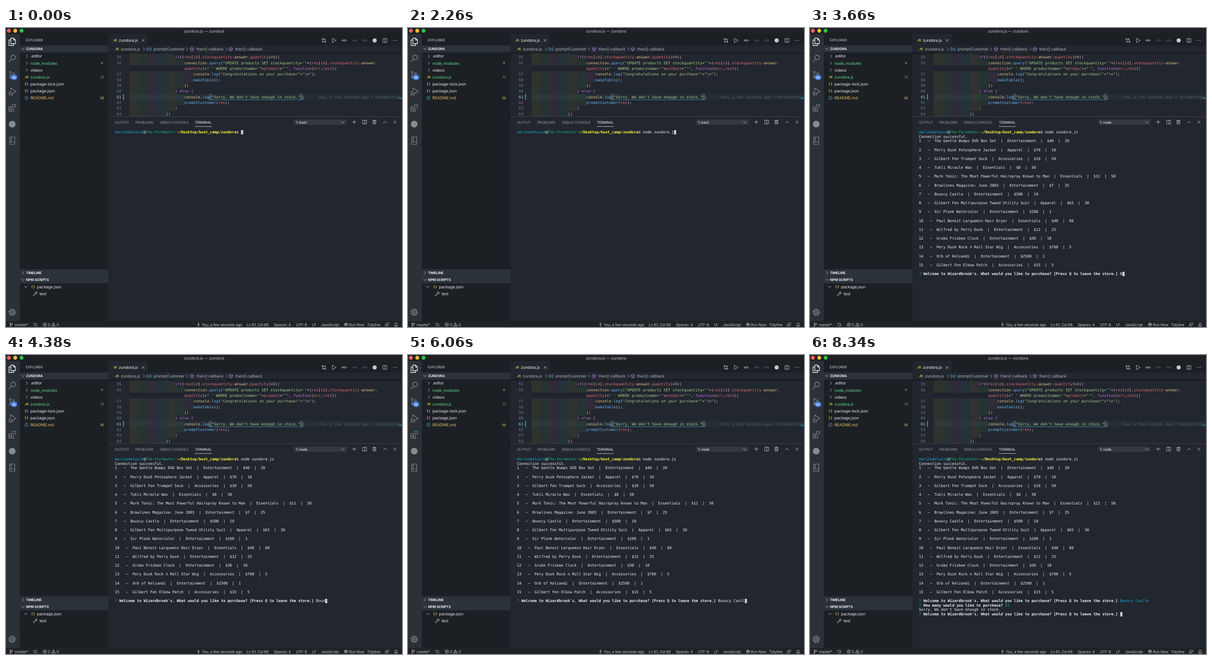
Animation, 862 px wide and 650 px high, one loop 8960 ms. Source, as an HTML page:

```html
<!DOCTYPE html>
<html lang="en">
<head>
<meta charset="utf-8">
<title>Editor session</title>
<style>
  html, body { margin: 0; width: 100%; height: 100%; overflow: hidden; background: #1d2125; }
  svg { display: block; width: 862px; height: 650px; }
  text { white-space: pre; text-rendering: geometricPrecision; }
  .ui { font-family: Inter, Roboto, sans-serif; letter-spacing: -.026em; }
  .mono { font: 8.23px "DejaVu Sans Mono", "Liberation Mono", monospace; }
  .term { letter-spacing: -.0168em; }
  .icon { fill: none; stroke-linecap: round; stroke-linejoin: round; }
</style>
</head>
<body>
<svg id="stage" viewBox="0 0 862 650">
  <defs>
    <clipPath id="codeClip"><rect x="223" y="53" width="639" height="139"/></clipPath>
    <linearGradient id="shade" x2="0" y2="1">
      <stop stop-color="#000" stop-opacity=".45"/><stop offset="1" stop-color="#000" stop-opacity="0"/>
    </linearGradient>
  </defs>
</svg>
<script>
const NS = 'http://www.w3.org/2000/svg';
const stage = document.getElementById('stage');

function add(tag, attrs, parent = stage) {
  const el = document.createElementNS(NS, tag);
  for (const key in attrs) el.setAttribute(key, attrs[key]);
  parent.appendChild(el);
  return el;
}
const rect = (x, y, width, height, fill, parent) => add('rect', { x, y, width, height, fill }, parent);
const disc = (cx, cy, r, fill) => add('circle', { cx, cy, r, fill });

// Text whose capitals are centred on y
function label(x, y, text, fill = '#dcdfe2', size = 8.9, weight = 400, anchor = 'start') {
  const el = add('text', { x, y: y + size * .36, fill, class: 'ui', 'font-size': size,
    'font-weight': weight, 'text-anchor': anchor });
  el.textContent = text;
  return el;
}
// Line drawing around a centre point
const icon = (x, y, d, stroke = '#c5c8cc', width = .9) =>
  add('path', { d, stroke, class: 'icon', 'stroke-width': width, transform: `translate(${x} ${y})` });

const ring = (r, x = 0, y = 0) => `M${x - r} ${y}a${r} ${r} 0 1 0 ${2 * r} 0a${r} ${r} 0 1 0 ${-2 * r} 0`;
const box = (x, y, w, h) => `M${x} ${y}h${w}v${h}h${-w}z`;
const RIGHT = 'M-1.6 -3L1.6 0L-1.6 3', DOWN = 'M-3 -1.6L0 1.6L3 -1.6', UP = 'M-3.5 2L0 -1.7L3.5 2';
const CROSS = 'M-2.7 -2.7L2.7 2.7M2.7 -2.7L-2.7 2.7';
const SPLIT = box(-4, -4, 8, 8) + 'M0 -4V4';
const CUBE = 'M0 -4L3.7 -2V2L0 4L-3.7 2V-2ZM-3.7 -2L0 0L3.7 -2M0 0V4';
const GREY = '#858b92', GREEN = '#62cd8d', AMBER = '#e3b964', YELLOW = '#e2c64c';
const script = (x, y) => label(x, y, 'JS', YELLOW, 6.8, 700);
const braces = (x, y) => label(x, y, '{ }', YELLOW, 7.2, 700);

// Window areas
rect(0, 0, 862, 650, '#1d2125');
rect(0, 13, 30, 624, '#2b3137');
rect(30, 13, 193, 624, '#1c2024');
rect(223, 13, 639, 624, '#22262e');
rect(309, 13, 553, 25, '#1c2024');
rect(30, 38, 193, 15, '#2b3239');
rect(30, 524.5, 193, 30.5, '#2b3239');
['#ff5f57', '#febc2e', '#28c840'].forEach((c, i) => disc(6.3 + i * 13.8, 6, 4.2, c));
label(431, 6.5, 'zundora.js — zundora', '#b8bbbf', 8.9, 400, 'middle');

// Activity bar
icon(13.5, 30, 'M-3 -8H3L7 -4V4H-3ZM3 -8V-4H7M-3 -4H-7V8H3V4', '#f0f1f2', 1.3);
icon(13.5, 66, ring(5, 2, -2) + 'M-1.6 1.6L-7 7.5', GREY, 1.3);
icon(12.5, 101, ring(2, -3, -5) + ring(2, 4, -2) + ring(2, -3, 6) + 'M-3 -3V4M4 0C4 3 -3 1 -3 4', GREY, 1.2);
add('rect', { x: 10.5, y: 101.5, width: 14, height: 11.5, rx: 5.7, fill: '#4582ec' });
label(17.5, 107.3, '5K', '#fff', 6.2, 600, 'middle');
icon(13.5, 138, 'M-3 -2V-8L8 0L0 5M-7 0L-5 1.5M-7.5 4H-6M-7 8L-5 6.5M1 8L-1 6.5M1.5 4H0' + ring(3, -3, 4.5), GREY, 1.2);
icon(13.5, 174, box(-7, -3, 5, 5) + box(-7, 2, 5, 5) + box(-2, 2, 5, 5) + box(1, -8, 6, 6), GREY, 1.2);
disc(13.5, 209, 7.3, GREY);
icon(13.5, 245, box(-5.5, -8, 11, 16) + 'M-5.5 3H5.5M-2 -8V3', GREY, 1.2);
icon(13.5, 618, ring(5.3) + ring(2), GREY, 1.3);
add('circle', { cx: 13.5, cy: 618, r: 6.8, fill: 'none', stroke: GREY, 'stroke-width': 2, 'stroke-dasharray': '2.67 2.67' });

// Explorer
label(43, 26.5, 'EXPLORER', '#c8ccd0', 7.54);
icon(37, 45.5, DOWN);
label(43.5, 45.5, 'ZUNDORA', '#e6e8ea', 7.54, 700);
const files = [['.editor'], ['node_modules', GREEN], ['videos'], ['zundora.js', GREEN],
  ['package-lock.json'], ['package.json'], ['README.md', AMBER]];
files.forEach(([name, color], i) => {
  const y = 61.2 + i * 15.1;
  label(53, y, name, color);
  if (i < 3) icon(45.5, y, RIGHT);
  else if (i === 3) script(41, y);
  else if (i < 6) braces(40.5, y);
  else icon(44.7, y, ring(3.6) + 'M0 -1.9V-1.8M0 -.2V2', '#519aba', .9);
});
disc(209, 76, 2.4, '#397a58');
label(209.5, 106.5, 'U', GREEN, 8.2, 400, 'middle');
label(209, 151.8, 'M', AMBER, 8.2, 400, 'middle');
icon(37, 532.3, RIGHT);
label(43.5, 532.3, 'TIMELINE', '#e6e8ea', 7.54, 700);
icon(37, 547.5, DOWN);
label(43.5, 547.5, 'NPM SCRIPTS', '#e6e8ea', 7.54, 700);
icon(43, 562.7, DOWN);
braces(55, 562.7);
label(67.5, 562.7, 'package.json');
icon(63.5, 578, 'M-4.3 3.2L0 -1.1A2.8 2.8 0 0 1 3.2 -4.4L1.6 -2.4L2.6 -1.4L4.5 -3A2.8 2.8 0 0 1 1.1 .2L-3.1 4.4Z');
label(73, 578, 'test');

// Tab, toolbar and breadcrumbs
script(233.5, 27);
label(245.5, 27, 'zundora.js', '#eef0f2');
icon(298.5, 27, CROSS);
icon(692, 27, ring(1.3, -3, -3) + ring(1.3, 3, 3) + 'M-3 -1.5V3H0M-1.5 1.5L0 3L-1.5 4.5M3 1.5V-3H0M1.5 -4.5L0 -3L1.5 -1.5');
icon(714, 27, 'M-3 -4.5L4.5 0L-3 4.5Z');
icon(736.5, 27, ring(2, 1, 0) + 'M3 0H5M-1 0H-5M-2.8 -2.2L-5 0L-2.8 2.2');
icon(759, 27, ring(2) + 'M-5 0H-2M2 0H5', '#596068');
icon(780.5, 27, ring(2, -1, 0) + 'M-5 0H-3M1 0H5M2.8 -2.2L5 0L2.8 2.2', '#596068');
disc(802.5, 27, 4.6, '#c5c8cc');
icon(825, 27, SPLIT);
[-3.3, 0, 3.3].forEach(dx => disc(847 + dx, 27, .8, '#c5c8cc'));
const CRUMB = '#a9aeb4';
script(237.5, 46);
label(250, 46, 'zundora.js', CRUMB);
[300.5, 394.5, 480].forEach(x => icon(x, 46, RIGHT, CRUMB));
icon(311.3, 46, 'M-2.8 -3.2H-4.4V3.2H-2.8M2.8 -3.2H4.4V3.2H2.8' + ring(1.7), '#62a9dd');
label(321, 46, 'promptCustomer', CRUMB);
[405, 489.5].forEach(x => {
  icon(x, 46, CUBE, '#b180d7');
  label(x + 9.5, 46, 'then() callback', CRUMB);
});

// Code
const code = add('g', { 'clip-path': 'url(#codeClip)' });
const CH = 4.953, LEFT = 269.1, ROW = 12.36;
const TINTS = ['#ffff40', '#7fff7f', '#ff7fff', '#4fecec'];
const SYNTAX = [
  [/"[^"]*"/, '#a9d18a'],
  [/\b(?:if|else|function)\b/, '#c678dd'],
  [/\b(?:console|connection|answer)\b|\}\)/, '#e5c98a'],
  [/\b\w+(?=\()/, '#6cb6f2'],
  [/\b(?:res2?|id|stockquantity|quantity|product|err)\b/, '#e06c75'],
  [/\b\d+\b/, '#d19a66'],
  [/[{}]/, '#cf85dc'],
  [/./, '#d0d5dd']
];
const TOKENS = new RegExp(SYNTAX.map(([re]) => `(${re.source})`).join('|'), 'g');

function codeLine(k, num, indent, source) {
  const y = 63.2 + k * ROW, top = y - ROW / 2;
  if (num) {
    for (let i = 0; i < indent / 4; i++)
      rect(LEFT + i * 4 * CH, top, 4 * CH, ROW, TINTS[i % 4], code).setAttribute('opacity', .057);
    const n = add('text', { x: 251, y: y + 3, class: 'mono', 'text-anchor': 'end',
      fill: num === 61 ? '#c5c9cf' : '#747b85' }, code);
    n.textContent = num;
  }
  const line = add('text', { x: LEFT + indent * CH, y: y + 3, class: 'mono' }, code);
  for (const [s, ...groups] of source.matchAll(TOKENS)) {
    const fill = SYNTAX[groups.findIndex(g => g !== undefined)][1];
    add('tspan', { fill }, line).textContent = s;
  }
}
const activeY = 63.2 + 7 * ROW;
rect(LEFT, activeY - ROW / 2, 593, ROW, '#252d35', code);
rect(LEFT, 63.2 + 1.5 * ROW, 24 * CH, ROW, '#20232b', code);
[
  [54, 16, '}).then( function(answer){'],
  [55, 20, 'if((res[id].stockquantity-answer.quantity)>0){'],
  [56, 24, `connection.query("UPDATE products SET stockquantity='"+(res[id].stockquantity-answer.`],
  [0, 24, `quantity)+" ' WHERE productname='"+product+"'", function(err,res2){`],
  [57, 28, 'console.log("Congratulations on your purchase!"+"\\n");'],
  [58, 28, 'makeTable();'],
  [59, 24, '})'],
  [60, 20, '} else {'],
  [61, 24, `console.log("Sorry. We don't have enough in stock.");`],
  [62, 24, 'promptCustomer(res);'],
  [63, 20, '}'],
  [64, 16, '})']
].forEach((row, i) => codeLine(i - 1, ...row));
[35, 75].forEach(col => add('rect', { x: LEFT + col * CH, y: activeY - 5.7, width: CH, height: 11.4,
  fill: 'none', stroke: '#8d949c', 'stroke-width': .7 }, code));
rect(443, 155.6, 204, .9, '#3f95ad', code);
rect(254.8, activeY - ROW / 2, 1.9, ROW, '#2aa5c9', code);
add('text', { x: 680.5, y: activeY + 3, class: 'mono', fill: '#565d66' }, code)
  .textContent = 'You, a few seconds ago • Uncommitted';
rect(855, 152, 7, 1.6, '#229bc6');
rect(223, 53, 639, 4, 'url(#shade)');

// Panel header
rect(223, 192, 639, .8, '#454b53');
[[237, 'OUTPUT'], [281.5, 'PROBLEMS'], [335, 'DEBUG CONSOLE'], [411, 'TERMINAL']].forEach(([x, s]) =>
  label(x, 205, s, s === 'TERMINAL' ? '#f0f1f2' : '#959ba2', 7.54));
rect(411, 213.7, 37, .9, '#d8dadd');
rect(627, 199, 114, 11.5, '#343940');
const shell = label(631, 205, '1: bash', '#eceef0', 7.8);
icon(733, 205, DOWN);
icon(758, 204.5, 'M-4 0H4M0 -4V4');
icon(781, 204.5, SPLIT);
icon(802, 204.5, 'M-4 -3H4M-1.3 -3V-4.4H1.3V-3M-3 -3V4.2H3V-3M-1 -1V2.4M1 -1V2.4');
icon(825, 204.5, UP);
icon(846.7, 204.5, CROSS);

// Status bar
rect(0, 637, 862, 13, '#1f2328');
const status = (x, s) => label(x, 644.7, s, '#bfc3c8', 8.23);
icon(11.5, 644.7, ring(1.2, -2, -2.8) + ring(1.2, 2, -1.6) + ring(1.2, -2, 2.8) + 'M-2 -1.6V1.6M2 -.4C2 1.5 -2 .5 -2 1.6');
icon(64, 644.7, 'M-3.2 -.6A3.3 3.3 0 0 1 3 -1.3M3.2 .6A3.3 3.3 0 0 1 -3 1.3M-4.3 -1.6L-3.2 -.4L-2 -1.6M4.3 1.6L3.2 .4L2 1.6');
icon(84.5, 644.7, ring(3.6) + 'M-1.4 -1.4L1.4 1.4M1.4 -1.4L-1.4 1.4');
icon(103.3, 644.7, 'M0 -3.6L4 3.3H-4ZM0 -1V1M0 2.1V2.2');
icon(419, 644.7, ring(1.7) + 'M0 -4.3V-1.7M0 1.7V4.3');
icon(740, 644.7, ring(.7) + 'M0 1V4M-1.8 1.6A2.3 2.3 0 1 1 1.8 1.6M-2.8 2.8A3.8 3.8 0 1 1 2.8 2.8');
icon(829, 644.7, 'M-.5 -3.5H4V1H2.5L1 2.5V1M-4 4C-4 .5 1 .5 1 4' + ring(1.5, -1.6, -.5), '#b9bdc2', .8);
icon(849.3, 644.7, 'M-3.5 2.5H3.5L2.5 1V-1A2.5 2.5 0 0 0 -2.5 -1V1ZM-1 4H1');
[[19, 'master*'], [91, '0'], [110, '0'], [426, 'You, a few seconds ago'], [524, 'Ln 61, Col 66'], [583, 'Spaces: 4'],
  [631, 'UTF-8'], [666, 'LF'], [685.5, 'JavaScript'], [746.5, 'Run Now'], [786, 'Tidyline']]
  .forEach(item => status(...item));

// Terminal
const TX = 237, TCH = 4.816, TROW = 9.625, CYAN = '#12a9d6', LIME = '#0dbc79', WHITE = '#eceef0';
const term = add('g', {});
const cursor = rect(0, 0, TCH, 9.4, '#c9ccd0');
const goods = [
  'The Gentle Wumps DVD Box Set|Entertainment|$40|20',
  'Perry Dusk Petosphere Jacket|Apparel|$70|10',
  'Gilbert Fen Trumpet Sock|Accessories|$10|50',
  'Tukli Miracle Wax|Essentials|$8|50',
  'Murk Tonic: The Most Powerful Hairspray Known to Man|Essentials|$11|50',
  'Browlines Magazine: June 2003|Entertainment|$7|25',
  'Bouncy Castle|Entertainment|$500|10',
  'Gilbert Fen Multipurpose Tweed Utility Suit|Apparel|$65|30',
  'Sir Plonk Watercolor|Entertainment|$100|1',
  'Paul Benoit Larquemin Hair Dryer|Essentials|$40|80',
  'Wilfred by Perry Dusk|Entertainment|$12|25',
  'Grubo Frisbee Clock|Entertainment|$30|10',
  'Pery Dusk Rock n Roll Star Wig|Accessories|$700|5',
  'Orb of Kelzandi|Entertainment|$2500|1',
  'Gilbert Fen Elbow Patch|Accessories|$15|5'
];
const listing = [[['Connection successful.']]];
goods.forEach((g, i) => listing.push([[`${i + 1}   –  ${g.split('|').join('  |  ')}`]], []));

const shellPrompt = [['marinodelwick', CYAN], ['@'], ['The-Fernmotor:', LIME],
  ['~/Desktop/boot_camp/zundora', '#f5f543', 700], ['$ ']];
const question = s => [['? ', LIME], [s + ' ', WHITE, 700]];
const shopPrompt = question("Welcome to Wizardbrook's. What would you like to purchase? [Press Q to leave the store.]");
const amountPrompt = question('How many would you like to purchase?');

const RUN = 2740, LIST = 3240, CHOOSE = 6400, ORDER = 7820;
const typed = (s, t, start, step) => s.slice(0, Math.max(0, Math.floor((t - start) / step) + 1));

function rowsAt(t) {
  const rows = [[...shellPrompt, [typed('node zundora.js', t, 300, 150)]]];
  if (t >= RUN && t < LIST) rows.push([]);
  if (t >= LIST) {
    const chosen = t >= CHOOSE;
    rows.push(...listing, [...shopPrompt, [typed('Bouncy Castle', t, 3600, 215), chosen ? CYAN : WHITE]]);
    if (chosen) rows.push([...amountPrompt, [typed('15', t, 7300, 220), t >= ORDER ? CYAN : WHITE]]);
  }
  if (t >= ORDER) rows.push([["Sorry. We don't have enough in stock."]], shopPrompt);
  return rows;
}

let shown = '';
function draw(t) {
  const rows = rowsAt(t), key = JSON.stringify(rows);
  if (key === shown) return;
  shown = key;
  term.replaceChildren();
  rows.forEach((parts, i) => {
    const line = add('text', { x: TX, y: 229.2 + i * TROW, class: 'mono term' }, term);
    for (const [s, fill = WHITE, weight = 400] of parts)
      add('tspan', { fill, 'font-weight': weight }, line).textContent = s;
  });
  const last = rows.length - 1;
  const cols = rows[last].reduce((n, [s]) => n + s.length, 0);
  cursor.setAttribute('x', TX + cols * TCH);
  cursor.setAttribute('y', 222 + last * TROW);
  shell.textContent = t < RUN ? '1: bash' : '1: node';
}

const begin = performance.now();
function tick() {
  draw((performance.now() - begin) % 8960);
  requestAnimationFrame(tick);
}
tick();
</script>
</body>
</html>
```
